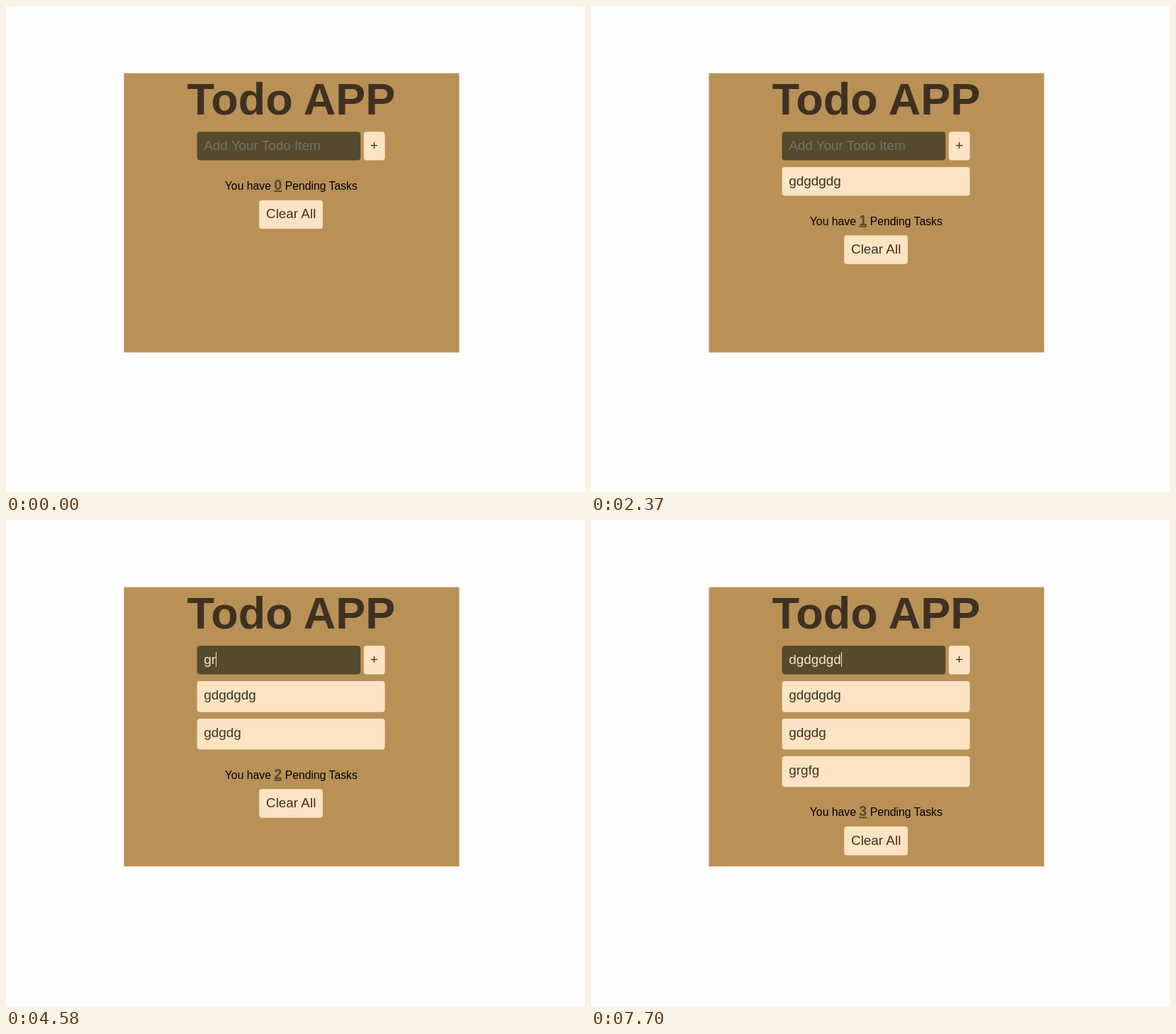
Animation, 817 px wide and 685 px high, one loop 8000 ms. Source, as an HTML page:

```html
<!DOCTYPE html>
<html lang="en">
<head>
<meta charset="utf-8">
<title>Todo APP</title>
<style>
  html, body { margin: 0; height: 100%; overflow: hidden; background: #fdfdfc; }
  svg { display: block; font: 18.9px "Liberation Sans", Arial, sans-serif; }
  .light { fill: #fbe3c3; }
  .dark { fill: #55492e; }
  .ink { fill: #3f3121; }
  .mid { text-anchor: middle; }
  #title { font-size: 63px; font-weight: bold; }
  #status { font-size: 15.76px; }
  #count { font-size: 19.7px; font-weight: bold; text-decoration: underline; }
</style>
</head>
<body>
<svg width="817" height="685" viewBox="0 0 817 685">
  <rect x="166.4" y="94.7" width="473" height="393.6" fill="#b99157"/>
  <text id="title" class="ink mid" x="402.4" y="153">Todo APP</text>
  <rect class="dark" x="269.6" y="177.2" width="230.6" height="40.3" rx="4"/>
  <text id="entry" x="279.2" y="203"></text>
  <rect id="caret" class="light" y="186" width="1" height="21"/>
  <rect class="light" x="504.8" y="177.2" width="29.8" height="40.3" rx="4"/>
  <text class="ink mid" x="519.6" y="203">+</text>
  <g id="list"></g>
  <g id="footer">
    <text id="status" class="mid" x="402.3" y="259">You have <tspan id="count" class="dark">0</tspan> Pending Tasks</text>
    <rect class="light" x="357.2" y="273.7" width="89.8" height="40.4" rx="4"/>
    <text class="ink mid" x="402.2" y="299.4">Clear All</text>
  </g>
</svg>
<script>
const LOOP = 8000, TEXT_X = 279.2, PITCH = 52.8, GAP = 9.2;
const $ = id => document.getElementById(id);

// [time, typed text, caret visible]
const typing = [[0, '', 0], [1030, '', 1]];
const type = (text, times) =>
  times.forEach((t, i) => typing.push([t, text.slice(0, i + 1), 1]));

type('gdgdgdg', [1230, 1310, 1370, 1490, 1570, 1640, 1710]);
typing.push([2270, 'gdgdgdg', 0], [2370, '', 0], [3290, '', 1]);
type('gdgdg', [3430, 3480, 3620, 3720, 3820]);
typing.push([4020, 'gdgdg', 0], [4120, '', 0], [4380, '', 1]);
type('grgfg', [4410, 4580, 4620, 4790, 4890]);
typing.push([5350, 'grgfg', 0], [5920, '', 0], [6510, '', 1]);
type('dgdgdgd', [6740, 6870, 7250, 7370, 7480, 7590, 7700]);

// The first row grows slightly once it has settled.
const items = [
  { text: 'gdgdgdg', added: 2370, settled: 2720 },
  { text: 'gdgdg', added: 4120, settled: 4120 },
  { text: 'grgfg', added: 5920, settled: 5920 }
];

function make(tag, className, attrs) {
  const el = document.createElementNS('http://www.w3.org/2000/svg', tag);
  el.setAttribute('class', className);
  for (const key in attrs) el.setAttribute(key, attrs[key]);
  return el;
}

items.forEach((item, i) => {
  item.row = make('g', 'row', { transform: `translate(0 ${227.1 + i * PITCH})` });
  item.box = make('rect', 'light', { x: 269.6, width: 265, rx: 4 });
  const label = make('text', 'ink', { x: TEXT_X, y: 26 });
  label.textContent = item.text;
  item.row.append(item.box, label);
  $('list').append(item.row);
});

function render(t) {
  const [, text, caret] = typing.findLast(step => step[0] <= t);
  const entry = $('entry');
  entry.textContent = text || 'Add Your Todo Item';
  entry.setAttribute('fill', text ? '#fbe6ca' : '#767268');
  $('caret').setAttribute('x', Math.round(TEXT_X + 0.3 + (text ? entry.getComputedTextLength() : 0)));
  $('caret').style.display = caret ? '' : 'none';

  let shift = 0, count = 0;
  for (const item of items) {
    const shown = t >= item.added;
    const height = t >= item.settled ? PITCH - GAP : 40.4;
    item.row.style.display = shown ? '' : 'none';
    item.box.setAttribute('height', height);
    if (shown) {
      shift += height + GAP;
      count++;
    }
  }
  $('count').textContent = count;
  $('footer').setAttribute('transform', `translate(0 ${shift})`);
}

const start = performance.now();
function tick() {
  render((performance.now() - start) % LOOP);
  requestAnimationFrame(tick);
}
tick();
</script>
</body>
</html>
```
